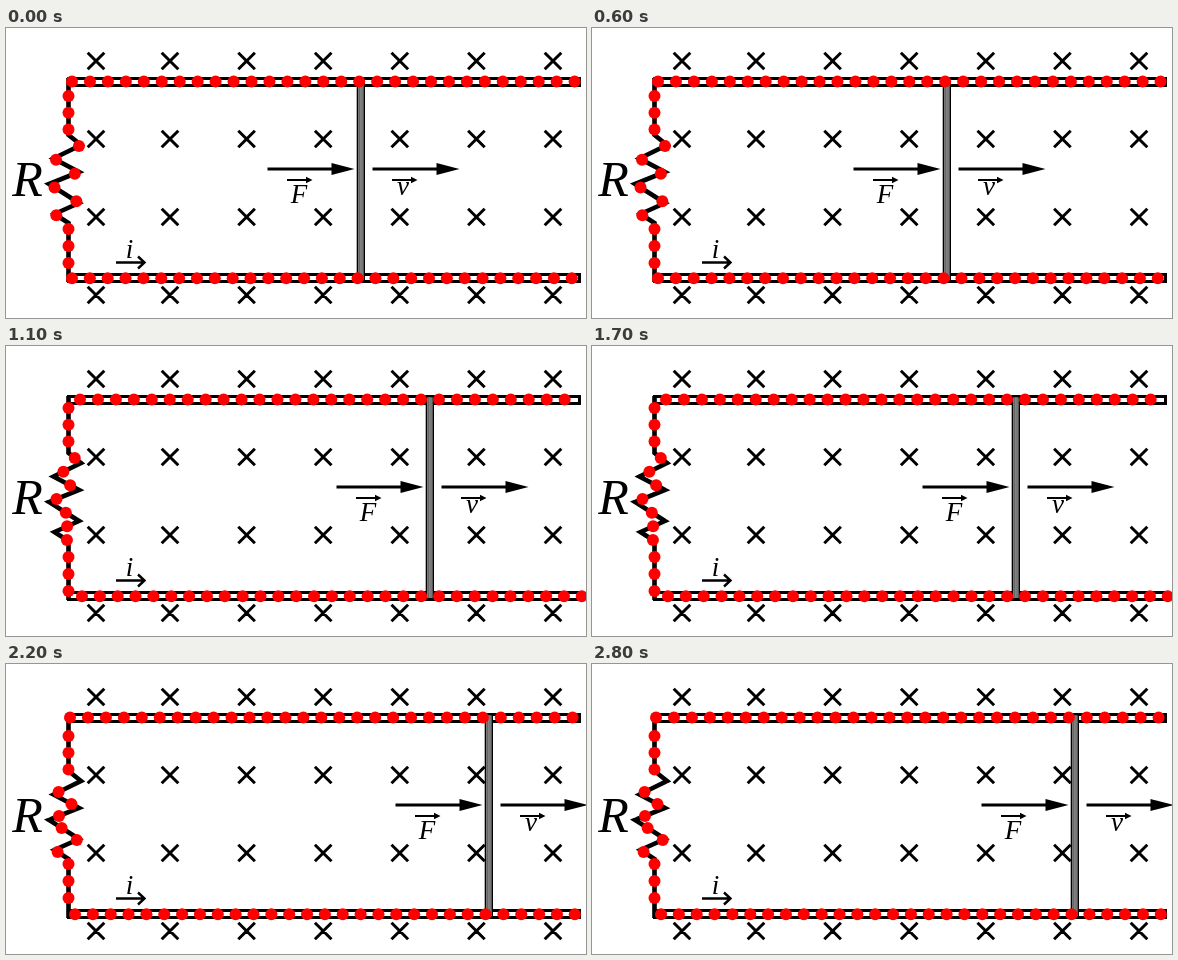
An HTML page that plays this animation: 580 px wide and 290 px high, repeating every 3300 ms.

```html
<!DOCTYPE html>
<html lang="en">
<head>
<meta charset="utf-8">
<title>Sliding bar in a magnetic field</title>
<style>
html, body { margin: 0; width: 100%; height: 100%; overflow: hidden; background: #fff; }
svg { display: block; }
text { font: italic 27px "Liberation Serif", "Times New Roman", serif; text-anchor: middle; }
.resistance { font-size: 50px; }
.line { fill: none; stroke: #000; stroke-width: 3; }
#wire { stroke-width: 4.6; }
</style>
</head>
<body>
<svg width="580" height="290" viewBox="0 0 580 290">
  <g class="line">
    <path d="M62.5 50.4H573.5V57.4H62.5ZM62.5 246.6H573.5V253.4H62.5Z"/>
    <path id="wire"/>
    <path id="field"/>
  </g>
  <text class="resistance" x="21.5" y="168">R</text>
  <text x="123.5" y="230">i</text>
  <path class="line" style="stroke-width:2.4" d="M110 234.5H138M132 228.5l6.5 6-6.5 6"/>
  <g id="slider">
    <path d="M-4.3 50H4V253.5H-4.3Z"/>
    <path fill="#aaa" d="M-2.7 51.5H2.5V252H-2.7Z"/>
    <path fill="#555" d="M-1.8 51.5H1.6V252H-1.8Z"/>
    <path fill="#888" d="M-.9 51.5H.7V252H-.9Z"/>
    <g id="arrows">
      <path d="M-93.5 139.5H-29.5V135L-6.5 141-29.5 147V142.5H-93.5Z"/>
      <path d="M-74 151H-55V148.8L-48.5 152-55 155.2V153H-74Z"/>
    </g>
    <use href="#arrows" x="105"/>
    <text x="-62" y="175">F</text>
    <text x="42" y="166.5">v</text>
  </g>
  <g id="charges" fill="#f00"></g>
</svg>
<script>
const el = id => document.getElementById(id);
const HOLD = 1100, VISIBLE = 500, BLINK = 600;

// Bar position and the first charge on each stretch of the circuit.
const poses = [
  { bar: 355, top: 66, bottom: 66, upper: 68, zigzag: 118, lower: 201 },
  { bar: 424, top: 74, bottom: 76, upper: 62, zigzag: 112, lower: 194 },
  { bar: 483, top: 64, bottom: 69, upper: 72, zigzag: 128, lower: 200 }
];

const wire = [[62.5, 50], [62.5, 107], [75, 117], [47.5, 130.5], [73, 144],
  [43, 156], [73, 175], [48.5, 186], [62.5, 195], [62.5, 254]];
el("wire").setAttribute("d", "M" + wire.join("L"));

const range = (start, step, end) =>
  Array.from({ length: Math.ceil((end - start) / step) }, (_, i) => start + i * step);

const cross = (x, y) => `M${x - 8.3} ${y - 8.3}l16.6 16.6m0-16.6l-16.6 16.6`;
el("field").setAttribute("d", range(33, 78, 270).map(y =>
  [90, ...range(164, 76.6, 550)].map(x => cross(x, y)).join("")).join(""));

function onWire(y) {
  const i = wire.findIndex(point => point[1] > y);
  const [x0, y0] = wire[i - 1], [x1, y1] = wire[i];
  return [x0 + (x1 - x0) * (y - y0) / (y1 - y0), y];
}

function showPose({ bar, top, bottom, upper, zigzag, lower }) {
  const dots = [
    ...range(top, 17.95, 575).map(x => [x, 53.5]),
    ...range(bottom, 17.85, 578).map(x => [x, 250.2]),
    ...[...range(upper, 16.7, 107), ...range(zigzag, (lower - zigzag) / 6, lower - 1),
      ...range(lower, 17, 246)].map(onWire)
  ];
  el("slider").setAttribute("transform", `translate(${bar})`);
  el("charges").innerHTML = dots.map(([x, y]) => `<circle cx="${x}" cy="${y}" r="6"/>`).join("");
}

let shown = -1;
function draw() {
  const t = performance.now() % (HOLD * poses.length);
  const index = Math.floor(t / HOLD), local = t % HOLD;
  if (index !== shown) showPose(poses[shown = index]);
  el("field").style.visibility = local >= VISIBLE && local < BLINK ? "hidden" : "visible";
  requestAnimationFrame(draw);
}
draw();
</script>
</body>
</html>
```
